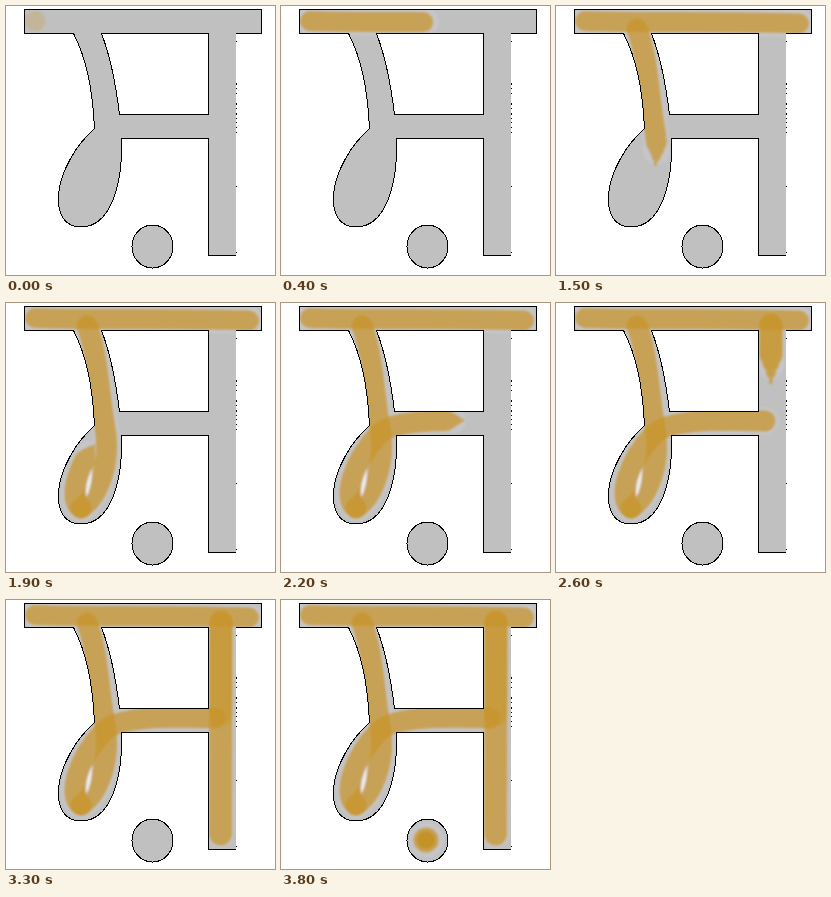
Animation of 269x269 px, one loop 3.9 s. Source, as an HTML page without scripts:

```html
<!DOCTYPE html>
<html lang="hi">
<head>
<meta charset="utf-8">
<title>Letter stroke order</title>
<style>
@property --t { syntax: "<number>"; inherits: true; initial-value: 0; }
html, body { margin: 0; width: 100%; height: 100%; overflow: hidden; background: #fff; }
svg { display: block; width: 100vw; height: 100vh; animation: tick 3.9s steps(39) infinite; }
@keyframes tick { from { --t: 0; } to { --t: 39; } }

.outline { fill: none; stroke: #000; shape-rendering: crispEdges; }
.face { fill: #c0c0c0; }

/* --s: first tick, --d: ticks to draw, --lag: how far the wide brush trails its tip, --w: brush width */
.bar { --s: 0; --d: 7.2; --lag: .2; --w: 20px; }
.stem { --s: 10; --d: 7; --lag: .8; --w: 21px; }
.loop { --s: 17; --d: 5.8; --lag: .5; --w: 21px; }
.post { --s: 24; --d: 7.4; --lag: 1; --w: 23px; }
.press { --s: 24; --d: 3.8; --lag: .8; --w: 23px; }
.dot { --s: 34; --d: 3; }

.brush, .halo { fill: none; stroke-linecap: round; stroke-linejoin: round; }
.brush { stroke: #c89428; opacity: clamp(0, (var(--t) - var(--s)) * .75 + .25, .72); }
.press { opacity: clamp(0, (var(--t) - var(--s)) * .2, .45); }
.halo { stroke: #c6c6ca; opacity: clamp(0, var(--t) - var(--s), 1); }
.stroke {
  stroke-dasharray: 100 300;
  stroke-dashoffset: calc(99.8px - 99.8px * clamp(0, (var(--t) - var(--s) - var(--lag) * var(--k)) / var(--d), 1));
  stroke-width: calc(var(--w) * (.15 + .85 * var(--k)));
}
.wide { --k: 1; }
.mid { --k: .66; }
.thin { --k: .33; }
.tip { --k: 0; }
.halo .stroke { --k: .6; stroke-width: 27px; }
.spot { transform-origin: 145px 240px; transform: scale(clamp(.3, (var(--t) - var(--s)) / var(--d), 1)); }
.ink { opacity: clamp(0, var(--t) - var(--s), 1); }
.gap { fill: #f0f0f0; opacity: clamp(0, var(--t) - 18, 1); }
</style>
</head>
<body>
<svg viewBox="0 0 269 269">
  <defs>
    <path id="body" fill-rule="evenodd" clip-rule="evenodd" d="M18.5 3.5H255.5V27.5H230V249.5H202.5V132.5H115.5C117 180 104 221 75 221C58 221 51 207 52.5 188C55 165 69 140 88.5 122.5C87 88 82 55 67.5 27.5H18.5Z
      M95.5 27.5C105 52 110 80 113.5 108.5H202.5V27.5Z"/>
    <ellipse id="round" cx="146.5" cy="240.5" rx="20.5" ry="21.5"/>
    <clipPath id="inside"><use href="#body"/><use href="#round"/></clipPath>
    <filter id="soft" filterUnits="userSpaceOnUse" x="0" y="0" width="269" height="269">
      <feGaussianBlur stdDeviation="1"/>
    </filter>
    <path id="bar" pathLength="100" d="M29 15C90 17 170 15 243 17.5"/>
    <path id="stem" pathLength="100" d="M81 23C92 52 93 90 98.500 122C106 160 92 194 75 205"/>
    <path id="loop" pathLength="100" d="M75 205C61 196 72 158 98 131C112 118 150 116 209 118"/>
    <path id="post" pathLength="100" d="M215 22L214.500 234"/>
    <path id="press" pathLength="100" d="M215 24V114"/>
  </defs>

  <g class="face"><use href="#body"/><use href="#round"/></g>

  <g clip-path="url(#inside)">
    <g filter="url(#soft)">
      <g class="halo bar"><use class="stroke" href="#bar"/></g>
      <g class="halo stem"><use class="stroke" href="#stem"/></g>
      <g class="halo loop"><use class="stroke" href="#loop"/></g>
      <g class="halo post"><use class="stroke" href="#post"/></g>
      <g class="halo dot"><circle class="spot" cx="145" cy="240" r="18" fill="#c6c6ca" stroke="none"/></g>
    </g>
    <g filter="url(#soft)">
      <g class="brush bar"><use class="stroke wide" href="#bar"/><use class="stroke tip" href="#bar"/></g>
      <g class="brush stem"><use class="stroke wide" href="#stem"/><use class="stroke mid" href="#stem"/><use class="stroke thin" href="#stem"/><use class="stroke tip" href="#stem"/></g>
      <g class="brush loop"><use class="stroke wide" href="#loop"/><use class="stroke mid" href="#loop"/><use class="stroke thin" href="#loop"/><use class="stroke tip" href="#loop"/></g>
      <g class="brush post"><use class="stroke wide" href="#post"/><use class="stroke mid" href="#post"/><use class="stroke thin" href="#post"/><use class="stroke tip" href="#post"/></g>
      <g class="brush press"><use class="stroke wide" href="#press"/><use class="stroke mid" href="#press"/><use class="stroke tip" href="#press"/></g>
      <g class="ink dot">
        <circle class="spot" cx="145" cy="240" r="12.5" fill="#c8a050"/>
        <circle class="spot" cx="145" cy="240" r="9" fill="#c49226"/>
      </g>
      <path class="gap" d="M86 166Q79 180 80 194Q86 184 86 166Z"/>
    </g>
  </g>

  <g class="outline">
    <path d="M230 27.5H255.5V3.5H18.5V27.5H67.5C82 55 87 88 88.5 122.5C69 140 55 165 52.5 188C51 207 58 221 75 221C104 221 117 180 115.5 132.5H202.5V249.5H230
      M95.5 27.5C105 52 110 80 113.5 108.5H202.5V27.5Z"/>
    <use href="#round"/>
    <path d="M230.5 35v1M230.5 77v2M230.5 82v1M230.5 87v1M230.5 97v2M230.5 102v1M230.5 107v2M230.5 112v1M230.5 116v1M230.5 121v1M230.5 126v1M230.5 180v1M230.5 246v1"/>
  </g>
</svg>
</body>
</html>
```
